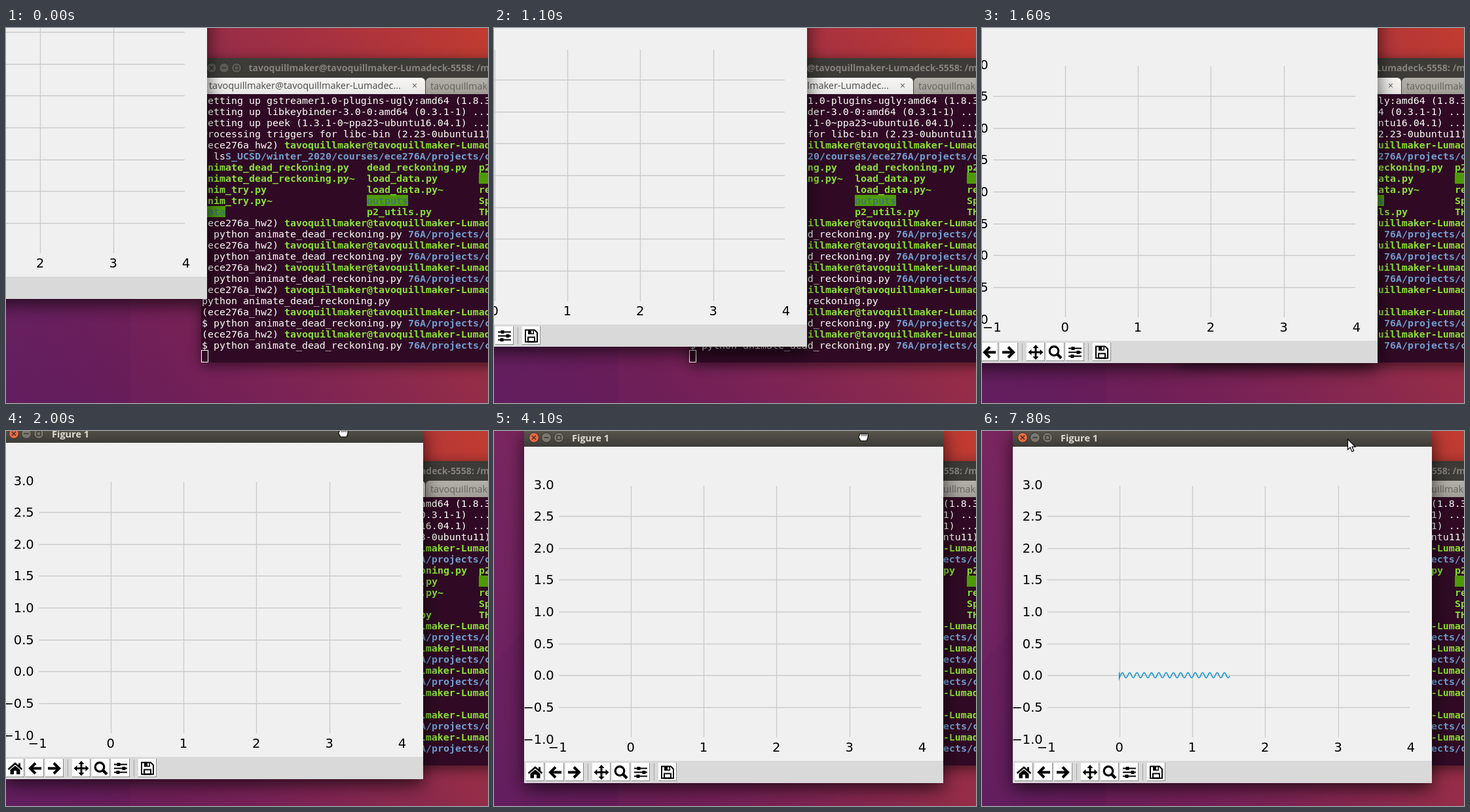
Write an HTML page with a canvas that moves like this. It is 736x573 px and loops after 8 s.

```html
<!DOCTYPE html>
<html lang="en">
<head>
<meta charset="utf-8">
<title>Trajectory plot</title>
<style>
html, body { margin: 0; width: 100%; height: 100%; overflow: hidden; background: #7a2254; }
canvas { display: block; }
</style>
</head>
<body>
<canvas id="stage" width="736" height="573"></canvas>
<script>
const W = 736, H = 573, LOOP = 8000, STEP = 100;
const c = document.getElementById('stage').getContext('2d');
const USER = 'tavoquillmaker', HOST = USER + '-Lumadeck-5558';
const UI = '"Open Sans", "Noto Sans", sans-serif';
const MONO = '"DejaVu Sans Mono", monospace';
const WHITE = '#ffffff', GREEN = '#8ae234', BLUE = '#729fcf';

// Keys: [time, ...values]
const DRAG = [
  [800, -380, -124], [900, -345, -110], [1000, -275, -80], [1100, -209, -51],
  [1200, -162, -40], [1300, -127, -33], [1400, -104, -29], [1500, -90, -27], [1600, -83, -26],
  [1800, -83, -26], [2000, -50, -6], [2100, -30, -3], [2200, -15, -2], [2400, -2, -1],
  [4000, -2, -1], [4200, 0, 0]
];
const TRACE = [
  [4700, 209.5], [5300, 240.5], [5600, 240.5], [5800, 269], [6000, 269], [6100, 284],
  [6200, 284], [6500, 300], [6700, 300], [6800, 322], [6900, 322], [7000, 333.5],
  [7100, 333.5], [7200, 346.5], [7300, 346.5], [7400, 358.5], [7500, 358.5], [7600, 370.5],
  [7700, 370.5], [7800, 378]
];
const LEAVE = [[4300, 563, 6], [4600, 556, -24]];
const ENTER = [[7000, 538, -8], [7100, 538, -8], [7200, 542, 2], [7300, 542, 2],
  [7400, 550, 7], [7500, 550, 7], [7600, 558, 12]];

function at(keys, t) {
  if (t <= keys[0][0]) return keys[0].slice(1);
  for (let i = 1; i < keys.length; i++) {
    const a = keys[i - 1], b = keys[i];
    if (t <= b[0]) {
      const k = (t - a[0]) / (b[0] - a[0]);
      return a.slice(1).map((v, j) => v + (b[j + 1] - v) * k);
    }
  }
  return keys[keys.length - 1].slice(1);
}

function gradient(x0, y0, x1, y1, stops) {
  const g = c.createLinearGradient(x0, y0, x1, y1);
  stops.forEach(([p, color]) => g.addColorStop(p, color));
  return g;
}

function rect(x, y, w, h, fill) {
  c.fillStyle = fill;
  c.fillRect(x, y, w, h);
}

function path(points, closed) {
  c.beginPath();
  points.forEach(([x, y]) => c.lineTo(x, y));
  if (closed) c.closePath();
}

function stroke(points, width, color = '#000') {
  path(points);
  c.lineWidth = width;
  c.strokeStyle = color;
  c.stroke();
}

function fill(points, color = '#000') {
  path(points, true);
  c.fillStyle = color;
  c.fill();
}

function text(str, x, y, font, color, align = 'left') {
  c.font = font;
  c.fillStyle = color;
  c.textAlign = align;
  c.fillText(str, x, y);
}

function disc(x, y, r, color, edge) {
  c.beginPath();
  c.arc(x, y, r, 0, 7);
  c.fillStyle = color;
  c.fill();
  c.lineWidth = 1;
  c.strokeStyle = edge;
  c.stroke();
}

function shadowed(x, y, w, h, radius, color, blur, offset, alpha) {
  c.save();
  c.shadowColor = `rgba(0,0,0,${alpha})`;
  c.shadowBlur = blur;
  c.shadowOffsetY = offset;
  c.fillStyle = color;
  c.beginPath();
  c.roundRect(x, y, w, h, radius);
  c.fill();
  c.restore();
}

function wallpaper() {
  rect(0, 0, W, H, gradient(0, H, W, 0, [
    [0, '#5e1a59'], [0.35, '#792256'], [0.55, '#8c2a4c'], [0.8, '#a9323f'], [1, '#c23c2f']
  ]));
  rect(0, 0, 240, H, gradient(0, 0, 240, 0, [[0, 'rgba(116,42,112,.4)'], [1, 'rgba(116,42,112,0)']]));
  fill([[0, 355], [190, 150], [190, H], [0, H]], 'rgba(70,10,80,.1)');
}

function windowButtons(x, y, focused) {
  const ink = focused ? '#33322d' : '#2f2e2a';
  const grey = focused ? '#7a776e' : '#5e5c56';
  [0, 19, 38].forEach((dx, i) => {
    disc(x + dx, y, 7.5, !i && focused ? '#ec6a42' : grey, ink);
  });
  stroke([[x - 3, y - 3], [x + 3, y + 3]], 1.5, ink);
  stroke([[x - 3, y + 3], [x + 3, y - 3]], 1.5, ink);
  stroke([[x + 15.5, y], [x + 22.5, y]], 1.5, ink);
  c.lineWidth = 1.3;
  c.strokeRect(x + 35, y - 3, 6, 6);
}

function put(row, col, str, color, bold) {
  text(str, 299 + col * 9, 116 + row * 17, (bold ? 'bold ' : '') + '14.95px ' + MONO, color);
}

function terminal() {
  shadowed(298, 46, 500, 465, 6, '#3c3b37', 20, 5, 0.55);
  windowButtons(314, 61, false);
  text(`${USER}@${HOST}: /m`, 738, 66, 'bold 14px ' + UI, '#85827c', 'right');

  c.fillStyle = gradient(0, 76, 0, 101, [[0, '#f7f6f5'], [1, '#e9e7e5']]);
  c.beginPath();
  c.roundRect(299, 76, 341, 25, [6, 6, 0, 0]);
  c.fill();
  c.fillStyle = gradient(0, 76, 0, 101, [[0, '#b3b0aa'], [1, '#a19e98']]);
  c.beginPath();
  c.roundRect(641, 76, 200, 25, [6, 6, 0, 0]);
  c.fill();
  text(`${USER}@${USER}-Lumadec…`, 310, 93, '14.5px ' + UI, '#4c4a48');
  text('×', 624, 93, '14px ' + UI, '#5a5855', 'center');
  text(`${USER}@${HOST}`, 648, 94, '14.5px ' + UI, '#66645f');

  rect(298, 101, W, 410, '#300a24');
  [
    'Setting up gstreamer1.0-plugins-ugly:amd64 (1.8.3',
    'Setting up libkeybinder-3.0-0:amd64 (0.3.1-1) ...',
    'Setting up peek (1.3.1-0~ppa23~ubuntu16.04.1) ...',
    'Processing triggers for libc-bin (2.23-0ubuntu11)'
  ].forEach((line, row) => put(row, 0, line, WHITE));

  [4, 11, 13, 15, 17, 19, 21].forEach(row => {
    put(row, 0, '(ece276a_hw2)', WHITE);
    put(row, 14, `${USER}@${HOST}`, GREEN, true);
  });
  put(5, 0, '$ ls', WHITE);
  put(5, 4, 'S_UCSD/winter_2020/courses/ece276A/projects/c', BLUE, true);

  rect(722, 221, 18, 17, '#4e9a06');
  rect(551, 255, 63, 17, '#4e9a06');
  rect(299, 272, 36, 17, '#4e9a06');
  [
    ['animate_dead_reckoning.py', 'dead_reckoning.py', 'p2'],
    ['animate_dead_reckoning.py~', 'load_data.py', ''],
    ['anim_try.py', 'load_data.py~', 're'],
    ['anim_try.py~', '', 'Sp'],
    ['', 'p2_utils.py', 'TH']
  ].forEach((names, i) => names.forEach((name, j) => put(6 + i, [0, 28, 47][j], name, GREEN, true)));
  put(9, 28, 'outputs', '#3465a4');
  put(10, 0, 'data', '#3465a4');

  const run = 'python animate_dead_reckoning.py';
  [12, 14, 16, 20, 22].forEach(row => {
    put(row, 0, '$ ' + run, WHITE);
    put(row, 35, '76A/projects/c', BLUE, true);
  });
  put(18, 0, run, WHITE);
  c.lineWidth = 1;
  c.strokeStyle = WHITE;
  c.strokeRect(298.5, 492.5, 10, 18);
}

const icons = {
  home() {
    stroke([[-10.5, 1.5], [0, -7.5], [10.5, 1.5]], 2.6);
    rect(5, -8, 3, 6, '#000');
    fill([[-7.5, 2], [0, -4], [7.5, 2], [7.5, 9], [2, 9], [2, 3.5], [-2, 3.5], [-2, 9], [-7.5, 9]]);
  },
  back() {
    stroke([[-7, 0], [10, 0]], 4);
    stroke([[1, -8], [-7, 0], [1, 8]], 4);
  },
  forward() {
    c.scale(-1, 1);
    icons.back();
  },
  pan() {
    for (let i = 0; i < 4; i++) {
      stroke([[0, 0], [8, 0]], 3);
      fill([[11.5, 0], [6.5, -4.5], [6.5, 4.5]]);
      c.rotate(Math.PI / 2);
    }
  },
  zoom() {
    c.beginPath();
    c.arc(-2, -2, 6.8, 0, 7);
    c.lineWidth = 3.2;
    c.stroke();
    stroke([[3, 3], [9, 9]], 4.5);
  },
  sliders() {
    [[-6, -3], [0, 5], [6, -4]].forEach(([y, x]) => {
      stroke([[-10, y], [10, y]], 2);
      rect(x - 2.5, y - 2.5, 5, 5, '#000');
    });
  },
  save() {
    c.lineWidth = 2;
    path([[-9, -9], [5, -9], [9, -5], [9, 9], [-9, 9]], true);
    c.stroke();
    rect(-5, -9, 9, 6.5, '#000');
    rect(0, -8, 2.5, 4, '#fff');
    c.strokeRect(-5, 2, 10, 7);
  }
};

function button(name, x) {
  rect(x, 507, 28, 28, '#8a8a8a');
  rect(x, 507, 27, 27, '#fff');
  c.save();
  c.translate(x + 14, 521.5);
  c.strokeStyle = '#000';
  icons[name]();
  c.restore();
}

const px = v => 209.56 + v * 111.36;
const py = v => 373.2 - v * 97.2;
const snap = v => Math.round(v) + 0.5;
const label = v => String(v).replace('-', '\u2212');

function plot(end) {
  const font = '19.44px "DejaVu Sans", sans-serif';
  for (let v = 0; v <= 3; v++) stroke([[snap(px(v)), 84], [snap(px(v)), 468]], 1.39, '#cbcbcb');
  for (let v = -0.5; v < 3; v += 0.5) stroke([[100, snap(py(v))], [653, snap(py(v))]], 1.39, '#cbcbcb');
  for (let v = -1; v <= 4; v++) text(label(v), px(v), 490, font, '#000', 'center');
  for (let v = -1; v <= 3; v += 0.5) {
    text(label(v.toFixed(1)), 92.7, Math.round(py(v) + 7.1), font, '#000', 'right');
  }
  if (end <= 209.5) return;
  const wave = [[209.6, 369], [209.6, 377.5]];
  for (let x = 210; x <= end; x += 0.5) {
    wave.push([x, 373.2 - 3.9 * Math.cos((x - 214.3) / 11.136 * 2 * Math.PI)]);
  }
  stroke(wave, 1.4, '#008fd5');
}

function figure(end) {
  shadowed(47, -4, 640, 542, [6, 6, 0, 0], '#f0f0f0', 28, 8, 0.7);
  c.fillStyle = gradient(0, -4, 0, 24, [[0, '#5c584f'], [1, '#3c3b37']]);
  c.beginPath();
  c.roundRect(47, -4, 640, 28, [6, 6, 0, 0]);
  c.fill();
  windowButtons(62, 10, true);
  text('Figure 1', 120, 16, 'bold 14.5px ' + UI, '#dfdbd2');
  plot(end);
  rect(47, 504, 640, 34, '#d9d9d9');
  Object.keys(icons).forEach((name, i) => button(name, 50 + i * 30 + (i > 2) * 11 + (i > 5) * 11));
  [144, 245].forEach(x => rect(x, 508, 1, 26, '#a3a3a3'));
}

function hand(x, y) {
  c.save();
  c.translate(x, y);
  c.fillStyle = '#fff';
  c.strokeStyle = '#000';
  c.lineWidth = 1.2;
  c.beginPath();
  c.moveTo(-5, -4);
  for (let i = 0; i < 4; i++) c.quadraticCurveTo(-3.5 + i * 3, -7, -2 + i * 3, -4);
  c.lineTo(7, 1);
  c.lineTo(5, 6);
  c.lineTo(-4, 6);
  c.lineTo(-7, 1);
  c.lineTo(-7, -1);
  c.closePath();
  c.fill();
  c.stroke();
  [-2, 1, 4].forEach(k => stroke([[k, -4], [k, -1]], 1));
  c.restore();
}

function arrow(x, y) {
  c.save();
  c.translate(x + 0.5, y + 0.5);
  path([[0, 0], [0, 16], [3.7, 12.6], [6.5, 19], [9.2, 17.8], [6.5, 11.6], [11.5, 11.6]], true);
  c.fillStyle = '#fff';
  c.fill();
  c.lineWidth = 1.2;
  c.strokeStyle = '#000';
  c.stroke();
  c.restore();
}

function draw(now) {
  const t = Math.floor((now % LOOP) / STEP) * STEP;
  const [dx, dy] = at(DRAG, t).map(Math.round);
  wallpaper();
  terminal();
  c.save();
  c.translate(dx, dy);
  figure(at(TRACE, t)[0]);
  if (t < 4300) hand(565, 9);
  c.restore();
  if (t >= 4300 && t < 4600) arrow(...at(LEAVE, t));
  if (t >= 7000) arrow(...at(ENTER, t));
  requestAnimationFrame(draw);
}
requestAnimationFrame(draw);
</script>
</body>
</html>
```
